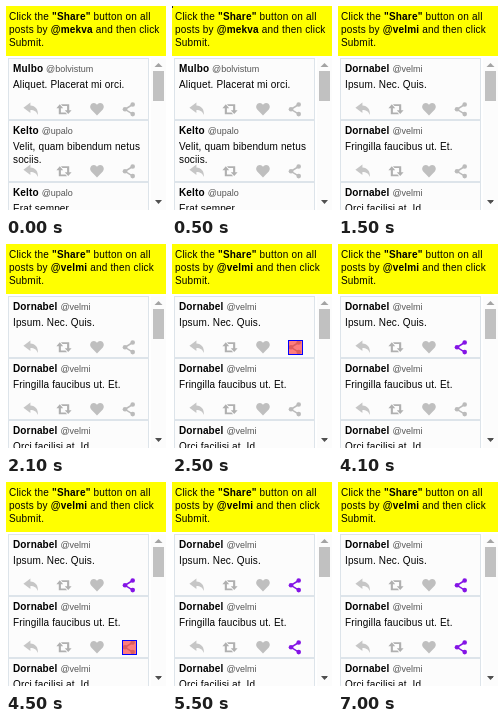
These frames come from a looping animation (160x210 px, 8000 ms). An HTML page:

```html
<!DOCTYPE html>
<html lang="en">
<head>
<meta charset="utf-8">
<title>Share the posts</title>
<style>
html, body { margin: 0; width: 100%; height: 100%; overflow: hidden; background: #fff; }
#stage {
  position: relative; width: 160px; height: 210px; overflow: hidden;
  font: 10px/13px "Liberation Sans", Arial, sans-serif; color: #000;
}
#stage div, #stage svg { position: absolute; }
#query { left: 0; top: 0; width: 160px; height: 50px; background: #ff0; }
#task { left: 3px; top: 4px; white-space: nowrap; letter-spacing: .19px; }
#feed { left: 0; top: 52px; width: 145px; height: 152px; overflow: hidden; }
.card { left: 2px; width: 141px; height: 62px; letter-spacing: .14px; }
.card svg { left: 0; top: 0; }
.name, .text { left: 5px; white-space: nowrap; }
.name { top: 4px; }
.text { top: 20px; }
.name span { font-size: 9px; letter-spacing: 0; color: #555; }
#over { left: 0; top: 0; }
</style>
</head>
<body>
<div id="stage">
  <div id="query"><div id="task"></div></div>
  <div id="feed"></div>
  <svg id="over" width="160" height="210">
    <rect x="145" y="52" width="15" height="152" fill="#fcfcfc"/>
    <rect x="147" y="65" width="11" height="30" fill="#c1c1c1"/>
    <path d="M148.5 61l4-4 4 4z" fill="#a3a3a3"/>
    <path d="M149 194l3.5 4 3.5-4z" fill="#505050"/>
    <rect id="pointer" width="1" height="2" fill="#222"/>
    <rect id="mark" x="116.5" width="14" height="14" fill="#f00" fill-opacity=".5" stroke="#00f"/>
  </svg>
</div>
<script>
const LOOP = 8000, SWITCH = 1500, PITCH = 62;
const $ = id => document.getElementById(id);

const scenes = [
  { user: '@mekva', posts: [
    ['Mulbo', '@bolvistum', 'Aliquet. Placerat mi orci.'],
    ['Kelto', '@upalo', 'Velit, quam bibendum netus<br>sociis.'],
    ['Kelto', '@upalo', 'Erat semper'],
  ] },
  { user: '@velmi', posts: [
    ['Dornabel', '@velmi', 'Ipsum. Nec. Quis.'],
    ['Dornabel', '@velmi', 'Fringilla faucibus ut. Et.'],
    ['Dornabel', '@velmi', 'Orci facilisi at. Id.'],
  ] },
];

// When each post's share button is pressed and when it turns active
const clicks = [{ press: 2500, done: 3500 }, { press: 4500, done: 5500 }];

const half = 'M53.8 98.3l3.4 3.9h-2.3v4.2h4.6l1.6 1.8h-8.3v-6h-2.4z';
const icons = `
  <path fill="#c6c6c6" d="M17.4 101.7L24.4 96.5V99.4C29.4 99.8 32.4 103 31.9 109C30.4 105.4 28.4 104 24.4 104V107Z"/>
  <g fill="#b0b0b0"><path d="${half}"/><path d="${half}" transform="rotate(180 58 103.2)"/></g>
  <path fill="#bfbfbf" d="M91 109.5L85.2 103.5C82.8 100.5 85 97 87.8 97C89.6 97 90.6 98.2 91 99C91.4 98.2 92.4 97 94.2 97C97 97 99.2 100.5 96.8 103.5Z"/>
  <g class="share">
    <path d="M126.7 98.5L119 103.3L126.7 108.1" fill="none" stroke="currentColor" stroke-width="1.5"/>
    <g fill="currentColor">
      <circle cx="126.7" cy="98.5" r="2.3"/><circle cx="119" cy="103.3" r="2.3"/><circle cx="126.7" cy="108.1" r="2.3"/>
    </g>
  </g>`;

const card = ([name, user, text], i) => `
  <div class="card" style="top:${i * PITCH}px">
    <svg width="141" height="62" viewBox="2 52 141 62">
      <rect x="2.5" y="52.5" width="140" height="61" fill="#fcfcfc" stroke="#dde4ea"/>${icons}
    </svg>
    <div class="name"><b>${name}</b> <span>${user}</span></div>
    <div class="text">${text}</div>
  </div>`;

let shown = -1;
function showScene(n) {
  if (n === shown) return;
  shown = n;
  const { user, posts } = scenes[n];
  $('task').innerHTML = `Click the <b>"Share"</b> button on all<br>posts by <b>${user}</b> and then click<br>Submit.`;
  $('feed').innerHTML = posts.map(card).join('');
}

function render(t) {
  showScene(t < SWITCH ? 0 : 1);
  const show = (id, on) => $(id).setAttribute('visibility', on ? 'visible' : 'hidden');
  show('pointer', t >= 500 && t < SWITCH);

  const active = clicks.findIndex(c => t >= c.press && t < c.done);
  show('mark', active >= 0);
  $('mark').setAttribute('y', 96.5 + Math.max(active, 0) * PITCH);

  document.querySelectorAll('.share').forEach((el, i) => {
    el.style.color = clicks[i] && t >= clicks[i].done ? '#8414e6' : '#bbb';
  });
}

const start = performance.now();
function tick() {
  render((performance.now() - start) % LOOP);
  requestAnimationFrame(tick);
}
tick();
</script>
</body>
</html>
```
